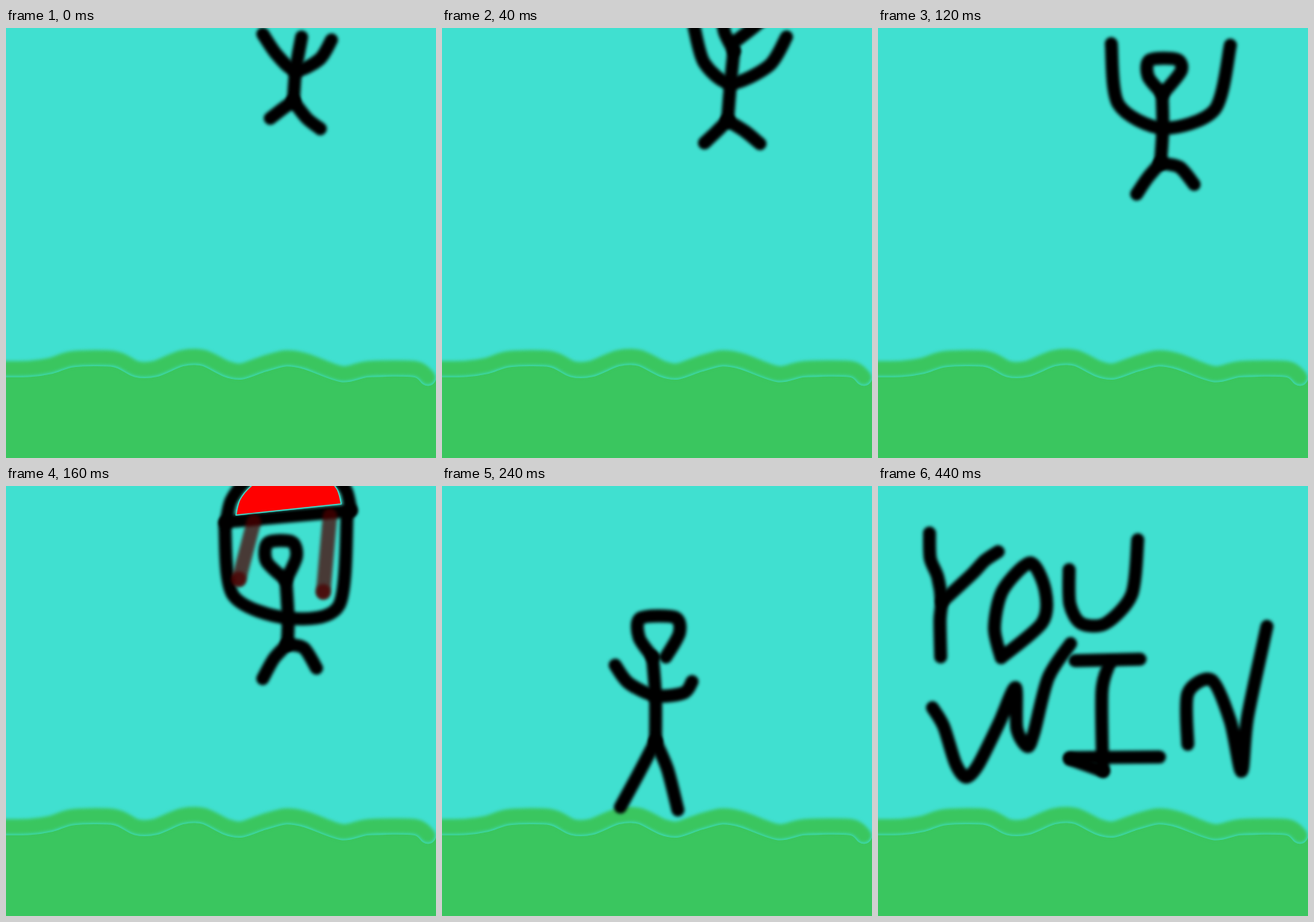
These frames come from a looping animation (576x576 px, 0.88 s). An HTML page:

```html
<!DOCTYPE html>
<html lang="en">
<head>
<meta charset="utf-8">
<title>Parachute landing</title>
<style>
html, body { margin: 0; width: 100%; height: 100%; overflow: hidden; background: #40e0d0; }
svg { display: block; width: 100vw; height: 100vh; }
path { stroke-linecap: round; stroke-linejoin: round; fill: none; }
.ink { stroke: #000; stroke-width: 17.5; filter: url(#soft); }
.wash { stroke: #4c0000; stroke-width: 19.5; stroke-opacity: .74; filter: url(#soft); }
.soil { fill: #3ac65f; }
.rim { stroke: #40e0d0; stroke-width: 22.6; }
.turf { stroke: #3ac65f; stroke-width: 20.5; filter: url(#soft); }
.red { fill: #f00; stroke: #40e0d0; stroke-width: 1.4; }
.dots { stroke: #f00; stroke-width: 1.5; stroke-dasharray: 0 4; }
</style>
</head>
<body>
<svg id="stage" viewBox="0 0 576 576">
  <defs>
    <filter id="soft" filterUnits="userSpaceOnUse" x="-40" y="-80" width="656" height="696" color-interpolation-filters="sRGB">
      <feGaussianBlur stdDeviation="2"/>
    </filter>
  </defs>
</svg>
<script>
const stage = document.getElementById('stage');

function add(parent, tag, attrs = {}) {
  const el = document.createElementNS('http://www.w3.org/2000/svg', tag);
  for (const k in attrs) el.setAttribute(k, attrs[k]);
  return parent.appendChild(el);
}

const points = s => s.split(' ').map(p => p.split(',').map(Number));
const mix = (a, b, t) => a.map((v, k) => v + (b[k] - v) * t);
const shift = ([x, y], dx, dy) => [x + dx, y + dy];

// Smooth curve through all the points
function curve(pts) {
  let d = 'M' + pts[0];
  for (let i = 0; i < pts.length - 1; i++) {
    const a = pts[i - 1] || pts[i], b = pts[i], c = pts[i + 1], e = pts[i + 2] || c;
    const out = b.map((v, k) => v + (c[k] - a[k]) / 7);
    const into = c.map((v, k) => v - (e[k] - b[k]) / 7);
    d += `C${out} ${into} ${c}`;
  }
  return d;
}

const brush = (g, cls, pts, tail = '') => add(g, 'path', { class: cls, d: curve(pts) + tail });

// Ground: the rim in sky colour leaves a thin seam below the turf
const hills = points('-4,456.5 32,456 60,452 90,443 146,443 175,456.5 200,456 235,442 265,441.5 295,456 315,459.5 345,449.5 375,442 402,446 450,463 485,456.5 548,456.5 565,468');
const ground = add(stage, 'g');
brush(ground, 'soil', hills, 'L578,470V578H-4Z');
brush(ground, 'rim', hills);
brush(ground, 'turf', hills);

// Joints: handL elbowL chest elbowR handR, neck hip, kneeL footL, kneeR footR, crown cheek chin
const high = points('344,8 363,36 388,57 420,42 436,16 396,12 385,98 371,108 354,121 403,121 421,135 383,-55 432,-40 395,-12');
const falling = points('332,-8 340,58 385,91 456,59 487,8 386,49 380,150 363,171 349,187 409,156 431,175 377,10 423,20 389,49');
const gliding = points('293,50 304,146 378,177 446,160 457,38 375,126 377,212 359,231 344,258 399,217 416,244 351,76 389,95 375,126');
const sinking = points('320,88 311,214 368,231 424,210 418,102 366,186 372,253 349,294 340,338 396,302 401,347 345,149 389,163 366,186');
const landed = points('232,240 250,264 286,281 324,277 335,262 282,229 286,342 263,386 239,430 302,379 316,434 266,177 318,197 300,229');

const between = (a, b) => a.map((p, i) => mix(p, b[i], .5));

function limbs(g, cls, pose) {
  const [handL, elbowL, chest, elbowR, handR, neck, hip, kneeL, footL, kneeR, footR] = pose;
  [
    [handL, elbowL, chest, elbowR, handR],
    [neck, chest, hip],
    [hip, kneeL, footL],
    [hip, kneeR, footR]
  ].forEach(s => brush(g, cls, s));
}

function figure(g, cls, pose) {
  const neck = pose[5], [crown, cheek, chin] = pose.slice(11);
  const jaw = [crown[0] - 2, crown[1] + (neck[1] - crown[1]) * .5];
  brush(g, cls, [neck, jaw, crown, [cheek[0] - 6, crown[1] - 1], cheek, chin]);
  limbs(g, cls, pose);
}

// Half ellipse standing on the line from l to r
const dome = (l, r, h) => Array.from({ length: 9 }, (_, i) => {
  const a = Math.PI * i / 8;
  return shift(mix(l, r, (1 - Math.cos(a)) / 2), 0, -h * Math.sin(a));
});

function chute(g, cls, l, r, h, ropes) {
  brush(g, cls, dome(l, r, h));
  brush(g, cls, [l, r]);
  brush(g, 'red', dome(shift(l, 13, -9), shift(r, -13, -9), h - 20), 'Z');
  ropes.forEach(rope => {
    const end = rope[1];
    brush(g, 'wash', rope);
    brush(g, 'wash', [end, shift(end, 0, -1)]);
  });
}

function openChute(g) {
  figure(g, 'ink', gliding);
  chute(g, 'ink', [295, 48], [462, 33], 72, [points('332,48 312,125'), points('434,40 425,142')]);
}

function lowChute(g) {
  const l = [322, 94], r = [419, 98];
  chute(g, 'wash', l, r, 64, [points('340,98 316,135'), points('406,112 428,146')]);
  figure(g, 'wash', sinking);
  brush(g, 'dots', [shift(l, 19, -3), shift(r, -17, -7)]);
}

const letters = [
  '69,63 70,97 80,122 85,155 83,180 84,229',
  '161,88 143,100 126,118 86,155',
  '165,230 156,190 167,140 204,103 224,140 220,183 165,230',
  '256,112 257,158 272,184 305,184 340,145 348,72',
  '73,297 88,322 104,372 118,390 134,374 162,318 184,270 186,325 200,349 209,330 228,257 258,211',
  '264,234 351,232',
  '310,238 300,275 301,381',
  '257,364 377,363',
  '257,366 302,382',
  '415,346 415,278 447,260 472,315 487,382 495,310 521,188'
].map(points);

const scenes = [
  [0, g => limbs(g, 'ink', high)],
  [40, g => figure(g, 'ink', between(high, falling))],
  [80, g => figure(g, 'ink', falling)],
  [120, g => figure(g, 'ink', between(falling, gliding))],
  [160, openChute],
  [200, lowChute],
  [240, g => figure(g, 'ink', landed)],
  [440, g => letters.forEach(s => brush(g, 'ink', s))]
].map(([at, draw]) => {
  const g = add(stage, 'g', { visibility: 'hidden' });
  draw(g);
  return { at, g };
});

const LOOP = 880;
function show(t) {
  const now = scenes.filter(s => s.at <= t).pop();
  scenes.forEach(s => s.g.setAttribute('visibility', s === now ? 'visible' : 'hidden'));
}

const start = performance.now();
function tick() {
  show((performance.now() - start) % LOOP);
  requestAnimationFrame(tick);
}
tick();
</script>
</body>
</html>
```
